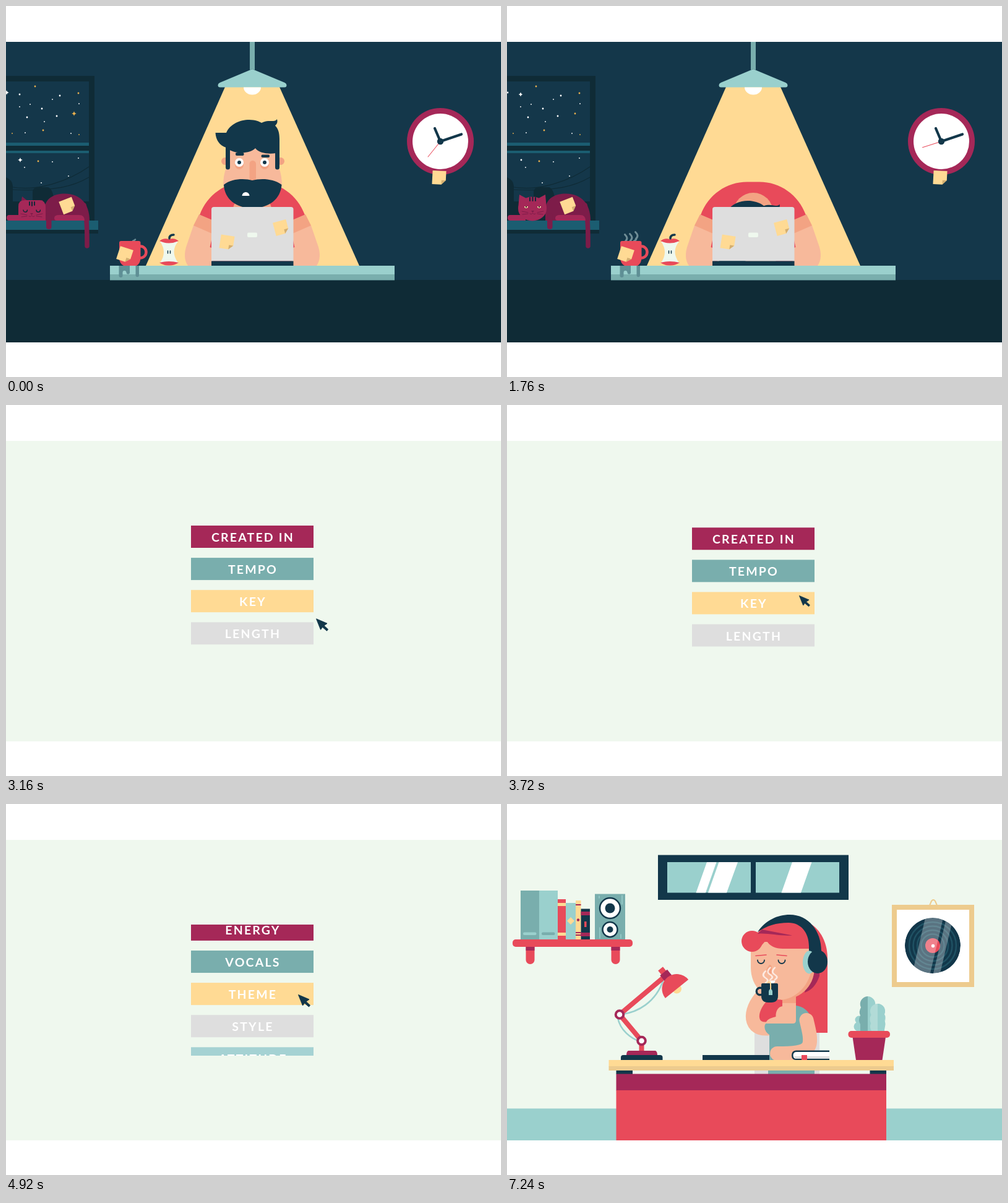
Recreate the animation shown at these times as an HTML page. Size 800x600 px, loop 7280 ms.

```html
<!DOCTYPE html>
<html lang="en">
<head>
<meta charset="utf-8">
<title>Late night to easy morning</title>
<style>
html, body { margin: 0; width: 100%; height: 100%; overflow: hidden; background: #fff; }
svg { display: block; width: 100%; height: 100%; }
.navy { fill: #12374a; } .night { fill: #0f2b36; } .red { fill: #e84a5a; } .wine { fill: #a52858; } .plum { fill: #7d1c49; }
.aqua { fill: #9ad0cd; } .teal { fill: #79aead; } .sand { fill: #ffda94; } .ochre { fill: #edcb8e; }
.skin { fill: #f7b99b; } .tan { fill: #f3a383; } .mint { fill: #eff8ee; } .grey { fill: #dedede; } .white { fill: #fff; }
.line { fill: none; stroke-linecap: round; stroke-linejoin: round; }
#rows text { font: 700 19.5px Lato, sans-serif; letter-spacing: 2.2px; text-anchor: middle; fill: #fff; }
</style>
</head>
<body>
<svg viewBox="0 0 800 600">
<defs>
  <clipPath id="stage"><rect y="58" width="800" height="486"/></clipPath>
  <clipPath id="list"><rect x="299" y="195" width="198" height="212"/></clipPath>
  <clipPath id="disc"><circle cx="688" cy="229" r="45"/></clipPath>
  <g id="note"><path class="sand" d="M-11-11H11V4L4 11H-11Z"/><path fill="#d3ae70" d="M11 4H4V11Z"/></g>
  <path id="wisp" pathLength="1" d="M0 0c5-5 3-8-1-12s-3-9 1-15"/>
  <g id="arm">
    <path class="skin" d="M303 355L291 390C287 404 289 415 297 424H334V352Z"/>
    <path class="tan" d="M312 337L333 346V368L303 355Z"/>
    <path class="red" d="M332 379V391L329.500 390Z"/>
  </g>
</defs>

<g clip-path="url(#stage)">
<g id="night">
  <rect y="58" width="800" height="486" fill="#14374a"/>
  <path class="night" d="M0 113H143V347H0Z"/>
  <path fill="#14374a" d="M0 122H134V316H0Z"/>
  <path class="night" d="M0 277Q10 281 11 291V316H0ZM43 316V300Q44 293 52 293H68Q76 296 78 316ZM0 226H134V234H0Z"/>
  <g class="line" stroke="#0f2b36" stroke-width="1.200"><path d="M134 260C100 284 50 300 11 293M134 277C110 291 80 300 11 297"/></g>
  <path fill="#1b5d71" d="M0 221H134V226H0ZM0 234H134V238H0ZM0 347H149V362H0Z"/>
  <path class="night" d="M0 362H149V368H0Z"/>
  <g id="stars"></g>

  <g id="cat">
    <path class="plum" d="M62 347V325C66 310 78 303.500 95 303.500C120 303.500 135 320 135 347Z"/>
    <path class="line" id="tail" stroke="#7d1c49" stroke-width="7.500"/>
    <rect class="plum" x="65" y="335" width="8.500" height="26" rx="4"/>
    <path class="wine" d="M82 347Q78 347 78 343Q78 338 86 338H118Q127 338 127 347ZM5 338H30V347H5Q1 347 1 342.500T5 338Z"/>
    <use href="#note" transform="translate(99.500 323) rotate(-21)"/>
    <g id="awake">
      <path class="wine" d="M18 328L20 305L33 312ZM64 328L62 305L49 312Z"/>
      <ellipse class="wine" cx="41" cy="328" rx="23" ry="19.500"/>
      <g class="line" stroke="#14283a" stroke-width="2"><path d="M37 310V315M41.500 309V315M46 310V315"/></g>
      <path fill="#f3d9a8" d="M28 324H34A3 3 0 0 1 28 324ZM49 324H55A3 3 0 0 1 49 324Z"/>
      <circle cx="31" cy="325" r="1"/><circle cx="52" cy="325" r="1"/>
    </g>
    <g id="asleep">
      <path class="plum" d="M24 320L26 308L36 316ZM58 320L59 314L48 316Z"/>
      <path class="wine" d="M20 347V324Q20 314 30 314H55Q64 315 64 325V347Z"/>
      <g class="line" stroke="#14283a"><path stroke-width="2" d="M38 317V322M42 317V323M46 317V322"/>
      <path stroke-width="1.400" d="M28 330a3.200 3.200 0 0 0 6.400 0M49 330a3.200 3.200 0 0 0 6.400 0"/></g>
    </g>
    <g id="muzzle">
      <path class="plum" d="M39 331H44L41.500 334Z"/>
      <g class="line" stroke="#7d1c49"><path d="M37 336Q39.500 338 41.500 335Q43.500 338 46 336M34 334L24 332M34 336L25 337M49 334L59 332M49 336L58 337"/></g>
    </g>
  </g>

  <g id="light">
    <path class="sand" d="M354 131H442L573.200 425H223.800Z"/>
    <path class="aqua" d="M398 102L450.500 124Q453.500 125.500 453.500 128Q453.500 131.500 450 131.500H346Q342.500 131.500 342.500 128Q342.500 125.500 345.500 124Z"/>
  </g>
  <path class="teal" d="M394 58H402V103.500L398 102L394 103.500Z"/>
  <path class="white" d="M384 131.500H412A14 12 0 0 1 384 131.500Z"/>

  <circle class="wine" cx="702" cy="219" r="54"/><circle class="white" cx="702" cy="219" r="45"/>
  <path class="line" id="second" stroke="#e84a5a" d="M702 219V187"/>
  <path class="line" stroke="#12374a" stroke-width="4.200" d="M693 198L702 219L736 207.500"/>
  <circle class="navy" cx="702" cy="219" r="5.200"/>
  <use href="#note" transform="translate(700 277.500) rotate(3)"/>

  <path class="red" d="M313 338C325 305 355 284.500 388 284.500H408C441 284.500 471 305 483 338L462 347V420H334V347Z"/>
  <circle class="tan" cx="398" cy="334" r="32"/>
  <g id="head">
    <circle class="tan" cx="354" cy="251" r="6"/><circle class="tan" cx="444" cy="251" r="6"/>
    <path class="skin" d="M356 222H441V262Q446 273 446 292H351Q351 273 356 262Z"/>
    <path class="navy" d="M355 222H362V261a3.500 3.500 0 0 1-7 0ZM435 222H442V261a3.500 3.500 0 0 1-7 0Z"/>
    <path class="navy" d="M338.500 205H356C362 191 378 184 393 184C403 184 410 187 413 189C420 185 427 186 432 186Q436 186 438 183Q440 189 435 193.500C441 199 442 208 442 216V238H436C424 240 409 238 403 230C397 236 387 238 375 237C366 236 359 232 356 229C345 226 339 216 338.500 205Z"/>
    <g class="tan"><circle cx="377" cy="257" r="7"/><circle cx="418" cy="257" r="7"/><rect x="393.500" y="250" width="10.500" height="34" rx="5.200"/></g>
    <g class="white"><circle cx="377" cy="253" r="7"/><circle cx="418" cy="253" r="7"/></g>
    <g class="navy">
      <circle cx="377" cy="253" r="3"/><circle cx="418" cy="253" r="3"/>
      <rect x="371" y="237" width="13.500" height="5" rx="2"/><rect x="412.500" y="240.500" width="13.500" height="4.500" rx="2"/>
      <path d="M352 289C365 278.500 386 278.500 398 282C412 278.500 432 279 445.500 289C444 312 425 327 398 327C372 327 353 312 352 289Z"/>
    </g>
    <path class="white" d="M381.500 307a6 6 0 0 1 12 0Z"/>
  </g>
  <use href="#arm"/><use href="#arm" transform="matrix(-1 0 0 1 796 0)"/>
  <path class="night" d="M0 443H800V544H0Z"/>

  <g id="desk">
    <path class="aqua" d="M168 420H628V434.500H168Z"/><path class="teal" d="M168 434H628V443.500H168Z"/>
    <path fill="#5f8f95" d="M182.500 420H215V436a2.800 2.800 0 0 1-5.500 0V420H200V431a2.700 2.700 0 0 1-5.400 0Q194 428 191.500 428Q188.500 428 188.500 431V436a3 3 0 0 1-6 0Z"/>
    <path class="grey" d="M332 412.500V329Q332 325 336 325H460.500Q464.500 325 464.500 329V412.500Z"/>
    <path class="navy" d="M332 412.500H464.500V420H332Z"/>
    <rect class="mint" x="390" y="366.500" width="16" height="7.500" rx="2"/>
    <use href="#note" transform="translate(357 382) rotate(9)"/>
    <use href="#note" transform="translate(444.500 358.500) rotate(-15)"/>
    <g id="brew" class="line" stroke="#6f8d96" stroke-width="3">
      <use href="#wisp" x="191" y="381"/><use href="#wisp" x="199" y="380"/><use href="#wisp" x="208" y="377"/>
    </g>
    <path class="line" stroke="#6f8d96" stroke-width="2.500" d="M205 380Q208 379 209 377.500"/>
    <circle class="line" cx="217" cy="398" r="9.500" stroke="#e84a5a" stroke-width="4.500"/>
    <path class="red" d="M183 383Q183 380 186 380H214.500Q217.500 380 217.500 383V407Q217.500 416 211 420H190Q183 416 183 407Z"/>
    <use href="#note" transform="translate(192 402) rotate(18)"/>
    <path class="mint" d="M249 381H278Q265 397 278 415H249Q261 398 249 381Z"/>
    <path class="red" d="M248 380Q255 374 263.500 377.500Q272 374 279 380Q263 387 248 380ZM248 415Q263 411 279 415Q271 420 263.500 419.500Q255 420 248 415Z"/>
    <path class="line" stroke="#12374a" stroke-width="3.500" d="M264 376Q264 370 271 370"/>
    <path class="line" stroke="#12374a" stroke-width="1.500" d="M261.500 396V400M265.500 396V400"/>
  </g>
</g>

<g id="menu">
  <path class="mint" d="M0 58H800V544H0Z"/>
  <g clip-path="url(#list)"><g id="rows"></g></g>
  <path id="cursor" class="navy" stroke="#12374a" stroke-linejoin="round" d="M.500.500L18 8L13 11.500L19.500 17.500L17.500 20L10.500 14L7.500 18Z"/>
</g>

<g id="day">
  <path class="mint" d="M0 58H800V493H0Z"/><path class="aqua" d="M0 492.500H800V544H0Z"/>
  <path class="navy" d="M244 82.500H552V155H244Z"/>
  <path class="aqua" d="M259 94H394V143.500H259ZM402 94H537V143.500H402Z"/>
  <path class="white" d="M323 94H338.500L321 143.500H305.500ZM342.500 94H373L355 143.500H325ZM461 94H492.500L475 143.500H443.500Z"/>

  <g id="shelf">
    <path class="red" d="M30.500 231H44.500V252a7 7 0 0 1-14 0ZM168.500 231H182.500V252a7 7 0 0 1-14 0Z"/>
    <path class="wine" d="M30.500 231H44.500V237H30.500ZM168.500 231H182.500V237H168.500Z"/>
    <rect class="red" x="9" y="219" width="194" height="12" rx="5"/>
    <path class="teal" d="M22 140H52V219H22ZM142 145.500H191V219H142Z"/>
    <path class="aqua" d="M52 140H82V219H52ZM95 160H111V219H95Z"/>
    <rect class="aqua" x="26" y="207.500" width="21.500" height="4.500" rx="2"/><rect class="teal" x="56" y="207.500" width="21.500" height="4.500" rx="2"/>
    <path class="red" d="M82 154H95V219H82Z"/>
    <path class="sand" d="M82 160H95V165H82ZM82 208H95V213H82ZM103 183L109 189L103 195L97 189ZM111 156H119.500V219H111Z"/>
    <path class="navy" d="M119.500 169.500H134V219H119.500Z"/>
    <path class="wine" d="M111 162H119.500V164H111ZM111 207H119.500V209H111ZM111 211H119.500V213H111ZM119.500 174H134V180H119.500ZM119.500 208H134V214H119.500Z"/>
    <circle class="wine" cx="115" cy="187.500" r="2.200"/><path class="red" d="M125 190H128.500V199H125Z"/>
    <path class="line" stroke="#9ad0cd" stroke-width="1.500" d="M149 149V152M186 148V162M150 200V217M184 211V217"/>
    <g class="white" stroke="#12374a" stroke-width="2.500"><circle cx="166.500" cy="168.500" r="16.500"/><circle cx="166.500" cy="203" r="12"/></g>
    <circle class="navy" cx="166.500" cy="168.500" r="8"/><circle class="navy" cx="166.500" cy="203" r="5"/>
  </g>

  <g id="vinyl">
    <path class="line" stroke="#edcb8e" stroke-width="2" d="M683 164L686 157Q689 153 692 157L695 164"/>
    <path class="ochre" d="M622 163H755V296H622Z"/><path class="white" d="M630 171H747V288H630Z"/>
    <g clip-path="url(#disc)">
      <circle class="navy" cx="688" cy="229" r="45"/>
      <g class="line" stroke="#1f5163" stroke-width="2.500"><circle cx="688" cy="229" r="38"/><circle cx="688" cy="229" r="31.500"/><circle cx="688" cy="229" r="25"/><circle cx="688" cy="229" r="18.500"/></g>
      <circle class="red" cx="688" cy="229" r="12"/>
      <path class="white" opacity=".3" d="M677 180H706L683 278H654ZM711 180H722L699 278H688Z"/>
      <circle class="white" cx="688.500" cy="229.500" r="2.700"/>
    </g>
  </g>

  <g id="cactus">
    <g class="aqua"><circle cx="569" cy="349" r="6.500"/><circle cx="568" cy="360" r="7.500"/><path d="M583 311a12.500 12.500 0 0 1 11 18q4 7 1 13q4 8 0 14V368H583Z"/></g>
    <path class="teal" d="M583 311a12.500 12.500 0 0 0-11 18q-4 7-1 13q-4 8 0 14V368H583Z"/>
    <g fill="#b2dbd7"><circle cx="599" cy="335" r="12"/><circle cx="599" cy="348" r="12.500"/><circle cx="599" cy="360" r="12"/></g>
    <path class="aqua" d="M599 323a12 12 0 0 1 11 17q3 5 0 10q3 6 0 12V368H599Z"/>
    <path class="wine" d="M558.500 377H612L606.500 414H564Z"/><rect class="red" x="551.500" y="367" width="67.500" height="11" rx="5"/>
  </g>

  <g id="lamp">
    <path class="line" stroke="#9ad0cd" stroke-width="2.500" d="M253 284C240 322 210 337 186 340M179 346C183 366 200 379 215 384"/>
    <path class="red" d="M213.500 385H221.500V400H213.500Z"/>
    <path class="line" stroke="#e84a5a" stroke-width="8" d="M217.500 383L182 340.500L256 278"/>
    <g class="white" stroke="#a52858" stroke-width="4"><circle cx="217.500" cy="383" r="6.300"/><circle cx="182" cy="340.500" r="6.300"/></g>
    <path class="wine" d="M196 399H240Q243 400 243 407H193Q193 400 196 399Z"/>
    <path class="navy" d="M184 414V410Q184 406 188 406H247.500Q251.500 406 251.500 410V414Z"/>
    <g transform="translate(274.500 299) rotate(-39)">
      <circle class="sand" r="7.500"/><path class="red" d="M-5-42H5V-32H-5Z"/><path class="wine" d="M-7.500-34H7.500V-20H-7.500Z"/>
      <path class="red" d="M-24 0A24 24 0 0 1 24 0Z"/>
    </g>
  </g>

  <path class="grey" d="M400 330H505V437H400Z"/>
  <g id="hair">
    <path class="red" d="M406 372V250C406 208 430 187 460 187C495 187 518 215 518 252V372Z"/>
    <path class="wine" d="M505 268V280C500 295 492 303 481 307L490 270Z"/>
  </g>
  <path class="skin" d="M445 312H467V358H418C418 347 428 346 434.500 344C434 335 438 328 445 327Z"/>
  <path class="tan" d="M445 312H467V322H445Z"/>
  <g id="face">
    <path class="tan" d="M394 225H497V266C497 300 470 319 443 319V300Z"/>
    <path class="skin" d="M394 225H493V262C491 296 465 318 443 318.500C418 318.500 394 299 394 266Z"/>
    <circle class="red" cx="396" cy="224" r="17"/>
    <path class="red" d="M404 212C415 195 440 190 465 193L490 210V236H446C434 236 424 232 419 222L405 238Z"/>
    <path class="wine" d="M405 212L412 205L461 214.500C440 216 420 210 405 212Z"/>
    <path class="navy" d="M405 209C418 190 437 181 457 181C487 181 508 207 508 240V262H488V232C488 210 475 194 455 194C435 194 420 199 405 209Z"/>
    <ellipse class="aqua" cx="488.500" cy="258" rx="10.500" ry="18.500"/><ellipse class="navy" cx="502" cy="257" rx="16" ry="19"/>
    <g class="line" stroke="#e84a5a" stroke-width="1.600"><path d="M402 247.500L419 246M436 246L452 247.500"/></g>
    <g class="line" stroke="#12374a" stroke-width="1.800"><path d="M405 254.500a5.500 5.500 0 0 0 11 0M438.500 254.500a5.500 5.500 0 0 0 11 0"/></g>
    <path class="tan" d="M424 262Q428 261 428 268V276Q419 278 419 271Q420 267 424 262Z"/>
    <path class="white" d="M423 287.500H433.500a5.200 5 0 0 1-10.500 0Z"/>
  </g>
  <path class="line" id="reach" stroke="#f7b99b" stroke-width="22"/>
  <path class="teal" d="M467 326C478 327 488 335 492 346L480 393V414H424V373C415 368 415 356 419 355H462Q467 355 467 350ZM422 430H497V437H422Z"/>
  <path class="line" stroke="#f7b99b" stroke-width="23" d="M484 349.500C488 366 491 378 489 388C486 401 468 403.500 436.500 403.500"/>
  <g id="cup">
    <circle class="line" cx="362" cy="368" r="5.700" stroke="#12374a" stroke-width="3.500"/>
    <path class="navy" d="M364 357Q364 355 366 355H389Q391 355 391 357V375Q391 386 380 386H375Q364 386 364 375Z"/>
    <path class="line" stroke="#ffda94" stroke-width="2" d="M373.500 354Q375 351.500 378 352.500Q379.500 354 379 366"/>
    <path class="aqua" d="M377 365H381L382 368V374H376V368Z"/>
  </g>
  <g id="tea" class="line" stroke="#fff" stroke-opacity=".7" stroke-width="2.600">
    <use href="#wisp" transform="translate(418 289) scale(1.100 .7)"/><use href="#wisp" transform="translate(425.500 284) scale(1.100 .72)"/><use href="#wisp" transform="translate(433 284) scale(1.100 .72)"/>
  </g>
  <path class="navy" d="M316 406H424V414H316Z"/>
  <path class="navy" d="M521 398.500H467Q460 399 460 406.500T467 414H521Z"/>
  <path class="white" d="M521 401H468Q462.500 401 462.500 406.500T468 412H521Z"/><path class="grey" d="M464 408H521V412H468Q465 412 464 408Z"/>
  <path class="red" d="M476 406H485V414H476Z"/>
  <path class="sand" d="M164.500 414H625V424.500H164.500Z"/><path class="ochre" d="M164.500 424H625V431H164.500Z"/>
  <path class="navy" d="M176.500 431H203V437H176.500ZM586.500 431H613V437H586.500Z"/>
  <path class="wine" d="M176.500 436.500H613V463.500H176.500Z"/><path class="red" d="M176.500 463H613V544H176.500Z"/>
</g>
</g>
</svg>

<script>
const LOOP = 7280, MENU = 2880, DAY = 5840, PITCH = 52.1;
const $ = id => document.getElementById(id);
const set = (id, name, value) => $(id).setAttribute(name, value);
const move = (id, x, y, extra = '') => set(id, 'transform', `translate(${x} ${y}) ${extra}`);
const show = (id, on) => set(id, 'display', on ? 'inline' : 'none');
const ramp = (t, a, b) => Math.min(1, Math.max(0, (t - a) / (b - a)));
const ease = (t, a, b) => { const u = ramp(t, a, b); return u * u * (3 - 2 * u); };
const mix = (a, b, u) => a + (b - a) * u;

// Eased value from a table of [time, value] steps
const track = (t, steps) => steps.reduce((v, [time, to], i) =>
  i ? mix(v, to, ease(t, steps[i - 1][0], time)) : to, 0);
const curve = (from, to, u) => {
  const p = from.map((v, i) => mix(v, to[i], u));
  return `M${p[0]} ${p[1]}C${p.slice(2).join(' ')}`;
};

// x, y, gold, sparkle time (-1: never)
const stars = [
  [1,140,0,0],[22,143,0,1800],[47,130,1,420],[75,151,0,-1],[87,145,0,2720],[117,141,1,2050],[118,158,0,-1],
  [39,159,0,-1],[22,163,0,-1],[58,166,0,1500],[110,174,1,0],[34,180,0,1000],[82,178,0,2720],[62,187,0,-1],
  [10,206,1,-1],[31,205,0,-1],[60,201,1,2720],[105,206,0,-1],[118,208,1,-1],[23,249,0,0],[52,251,1,2720],
  [75,252,0,-1],[117,246,0,-1],[30,261,0,-1],[57,286,0,-1],[101,275,0,-1]
];
$('stars').innerHTML = stars.map(([x, y, gold, peak], i) =>
  `<g transform="translate(${x} ${y})" fill="${gold ? '#e9b04e' : '#fff'}"><circle r="${peak < 0 ? .9 : 1.4}"/>` +
  `<path id="star${i}" d="M0-4Q.6-.6 4 0Q.6.6 0 4Q-.6.6-4 0Q-.6-.6 0-4"/></g>`).join('');

const rows = [
  ['MOOD', '#e84a5a'], ['ENERGY', '#a52858'], ['VOCALS', '#79aead'], ['THEME', '#ffda94'], ['STYLE', '#dedede'],
  ['ATTITUDE', '#a5d2d3'], ['DENSITY', '#7a7a7a'], ['ORG. ELECT.', '#edcb8e'], ['GENRE', '#e84a5a'],
  ['CREATED IN', '#a52858'], ['TEMPO', '#79aead'], ['KEY', '#ffda94'], ['LENGTH', '#dedede']
];
$('rows').innerHTML = rows.map(([label, fill], i) =>
  `<g transform="translate(299 ${195 + (i - 9) * PITCH})"><rect width="198" height="36" fill="${fill}"/>` +
  `<text x="100" y="26">${label}</text></g>`).join('');

// Wisps draw upward, then leave from the bottom
function steam(id, grow, fade) {
  show(id, grow > fade);
  set(id, 'stroke-dasharray', `0 ${fade} ${Math.max(0, grow - fade)} 2`);
}

function night(t) {
  stars.forEach(([, , , peak], i) => {
    const size = peak < 0 ? 0 : Math.max(0, 1 - Math.abs(t - peak) / 260);
    set('star' + i, 'transform', `scale(${size})`);
  });
  set('second', 'transform', `rotate(${218.7 + t * .01915} 702 219)`);
  const drop = track(t, [[160, 0], [320, -8], [520, 134], [600, 129], [680, 132]]);
  move('head', 0, drop, `rotate(${8 * ease(t, 320, 520)} 398 205)`);
  move('desk', 0, track(t, [[500, 0], [550, 4], [620, -1], [690, 0]]));
  const dim = [440, 1280, 1880].some(a => t >= a && t < a + 80);
  set('light', 'opacity', dim ? .85 : 1);

  const woken = t >= 600;
  show('awake', woken);
  show('asleep', !woken);
  const rise = ease(t, 600, 740);
  move('awake', 0, 5 * (1 - rise));
  move('muzzle', 0, 4 * (1 - rise));
  const swing = track(t, [[620, 0], [940, 1], [1080, 1], [1480, 0]]);
  set('tail', 'd', curve([126, 322, 131, 340, 131, 365, 131, 388], [126, 322, 133, 358, 147, 378, 163, 352], swing));
  const puff = t % 1360;
  steam('brew', ease(puff, 60, 800), ease(puff, 1000, 1340));
}

function menu(t) {
  move('rows', 0, 9 * PITCH * ease(t, 3640, 5300));
  const u = ease(t, MENU, 3640);
  const press = track(t, [[3580, 1], [3660, .82], [3800, 1]]);
  move('cursor', mix(514, 472, u), mix(362, 308, u), `scale(${press})`);
}

function day(t) {
  const lift = ease(t, DAY, 6620), nod = -2 * ease(t, DAY, 6540);
  move('hair', 0, nod);
  move('face', 0, nod);
  move('cup', 47 * lift, -65 * lift);
  set('reach', 'd', curve([430, 384, 408, 392, 384, 397, 367, 376], [424, 363, 391, 368, 389, 334, 413, 310], lift));
  steam('tea', ease(t, 6600, 7160), 0);
}

const scenes = { night, menu, day };
const start = performance.now();
function draw(now) {
  const t = Math.max(0, now - start) % LOOP;
  const current = t < MENU ? 'night' : t < DAY ? 'menu' : 'day';
  for (const id in scenes) show(id, id === current);
  scenes[current](t);
  requestAnimationFrame(draw);
}
draw(start);
</script>
</body>
</html>
```
